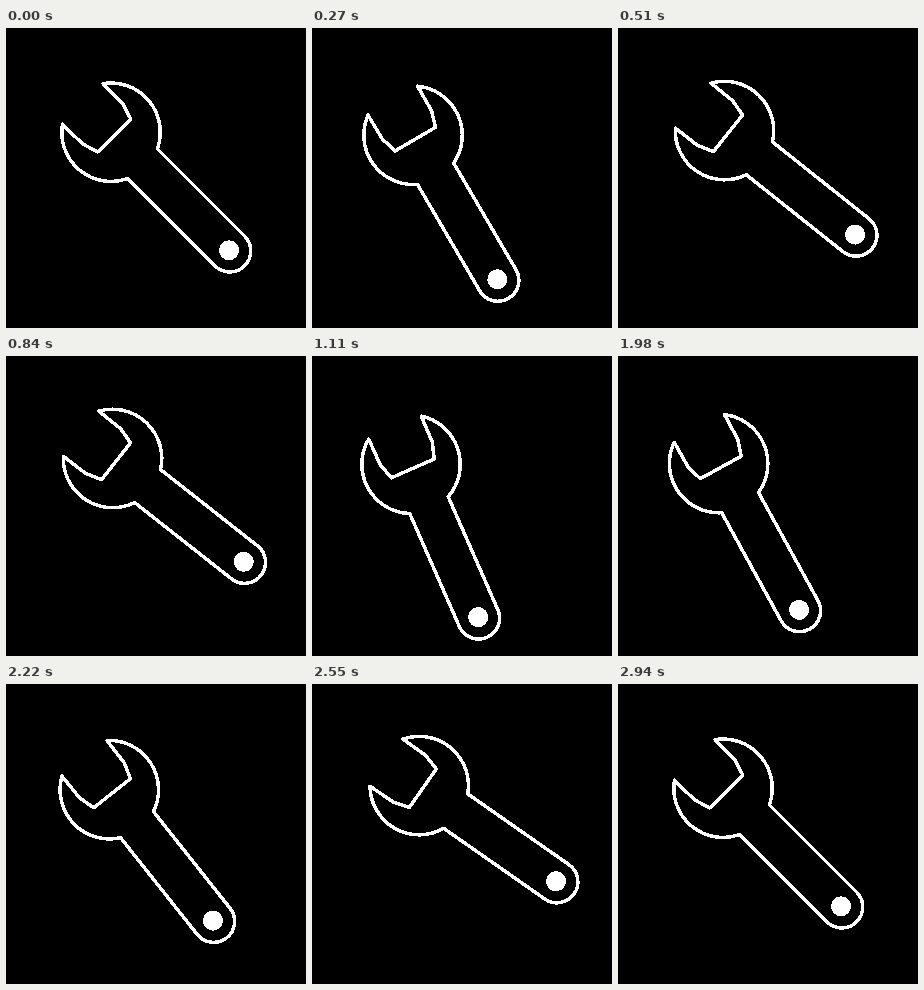
Write an HTML page that moves like this. It is 300 px wide and 300 px high and loops after 3970 ms.

```html
<!DOCTYPE html>
<html lang="en">
<head>
<meta charset="utf-8">
<title>Turning wrench</title>
<style>
  html, body { margin: 0; width: 100%; height: 100%; overflow: hidden; background: #000; }
  svg { display: block; width: 100%; height: 100%; }
</style>
</head>
<body>
<svg viewBox="0 0 300 300" shape-rendering="crispEdges">
  <g id="wrench" fill="none" stroke="#fff" stroke-width="3.5" stroke-linejoin="round">
    <path d="M-40-28.7 A49.3 49.3 0 0 1 44.6-21 H168 A21 21 0 0 1 168 21
             H44.6 A49.3 49.3 0 0 1 -40 28.7 L-12 28.4 L4.5 23.4 V-23.4 L-12-28.4 Z"/>
    <circle cx="167" r="10" fill="#fff" stroke="none"/>
  </g>
</svg>
<script>
  const LOOP = 3970, STEP = 30;
  const REST = 45, HIGH = 22.5, LOW = -10.5;

  // Steps at which the wrench changes direction: rest, high, low, high, low, ..., rest.
  const turns = [0, 5, 26, 35.6, 57, 69.5, 84, 98];
  const last = turns.length - 1;

  function poseAt(turn) {
    if (turn === 0 || turn === last) return 0;
    return turn % 2 ? HIGH : LOW;
  }

  const smooth = u => u * u * (3 - 2 * u);

  function angleAt(step) {
    if (step >= turns[last]) return 0;
    const next = turns.findIndex(turn => step < turn);
    const start = turns[next - 1];
    const from = poseAt(next - 1), to = poseAt(next);
    const u = (step - start) / (turns[next] - start);
    // Upstrokes are even; falling back and settling slow down towards the end.
    const skew = to === HIGH ? 1 : 1.8;
    return from + (to - from) * smooth(1 - (1 - u) ** skew);
  }

  const wrench = document.getElementById('wrench');

  function draw() {
    const step = Math.floor(performance.now() % LOOP / STEP);
    wrench.setAttribute('transform',
      `translate(91.2 90.4) rotate(${REST + angleAt(step)}) translate(19.5 0)`);
    requestAnimationFrame(draw);
  }
  draw();
</script>
</body>
</html>
```
